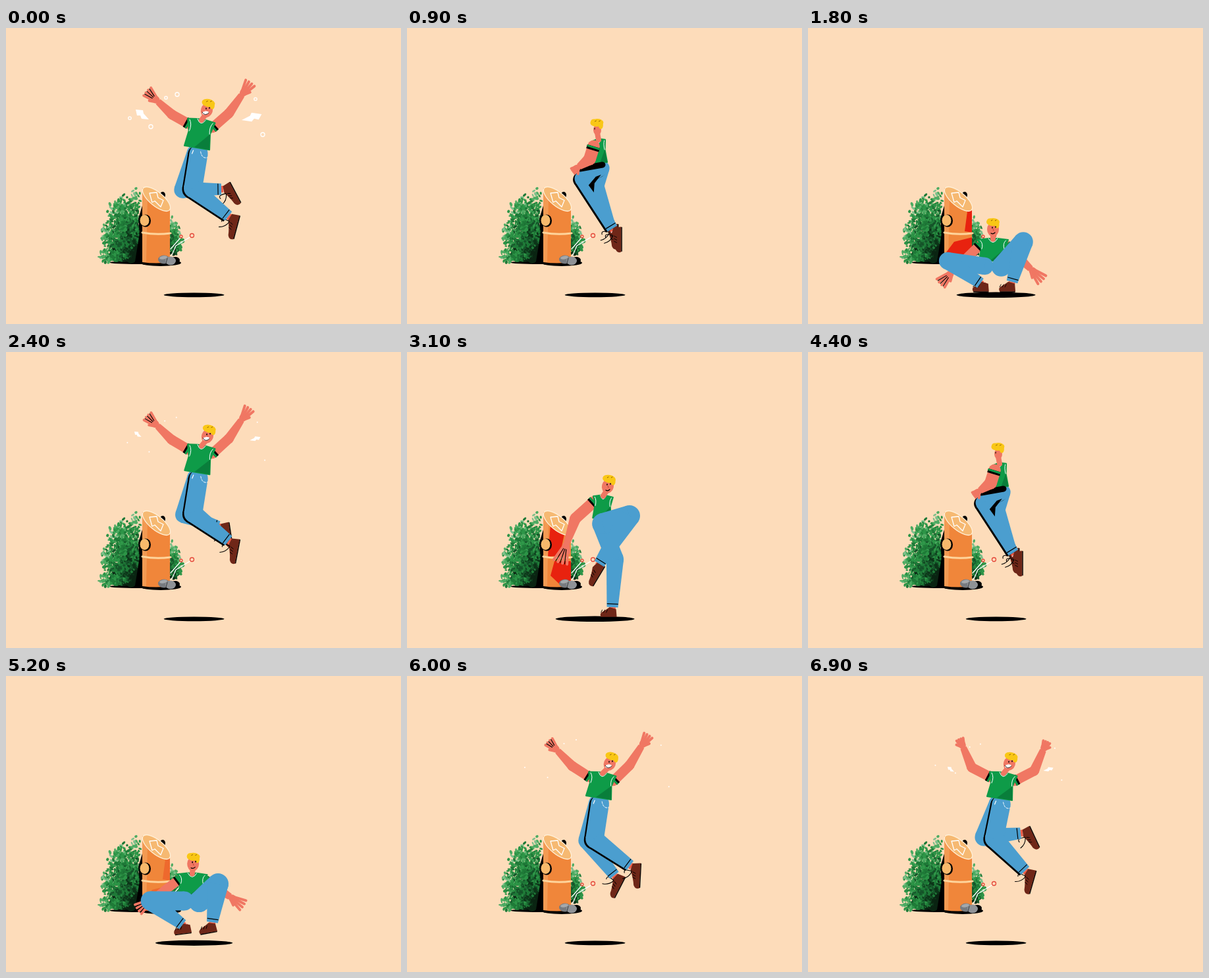
An HTML page with a canvas for the animation above (7 s loop, 600 px wide and 450 px high).

```html
<!DOCTYPE html>
<html lang="en">
<head>
<meta charset="utf-8">
<title>Jump</title>
<style>
html, body { margin: 0; width: 100%; height: 100%; overflow: hidden; background: #fddcba; }
canvas { display: block; width: 600px; height: 450px; }
</style>
</head>
<body>
<canvas id="stage" width="600" height="450"></canvas>
<script>
const view = document.getElementById('stage').getContext('2d');
let c = view;

const BG = '#fddcba', SKIN = '#f07763', GREEN = '#0e9b48', BLUE = '#4b9ecf',
  BROWN = '#6f2718', HAIR = '#f9c716', RED = '#e8220f', BLACK = '#000', WHITE = '#fff';
const CYCLE = 3500 / 3, STEP = 100;

// Key poses of one jump. Leg "back" is the one behind in the air; "wide" is half the shoulder width.
const leap = {
  t: 0, neck: [297, 140], hip: [290, 182], wide: 21, tilt: 8, bow: .06, reach: 16,
  wristL: [231, 112], wristR: [358, 102],
  back: { knee: [268, 246], ankle: [327, 245], toe: 62 },
  front: { knee: [284, 244], ankle: [338, 286], toe: 105 }
};
const fall = {
  ...leap, t: 167, neck: [297, 148], hip: [291, 185], tilt: 11, reach: 13,
  wristL: [229, 114], wristR: [356, 107],
  back: { knee: [273, 250], ankle: [315, 303], toe: 117 },
  front: { knee: [285, 248], ankle: [339, 288], toe: 93 }
};
const crouch = {
  t: 633, neck: [281, 321], hip: [281, 354], wide: 23, tilt: 0, bow: 0, reach: 18,
  wristL: [219, 371], wristR: [338, 366],
  back: { knee: [212, 354], ankle: [262, 388], toe: 180 },
  front: { knee: [327, 325], ankle: [310, 386], toe: 180 }
};
const kick = {
  t: 767, neck: [298, 219], hip: [296, 253], wide: 15, tilt: 7, bow: -.13, reach: 25,
  wristL: [243, 290], wristR: [304, 240],
  back: { knee: [338, 249], ankle: [292, 322], toe: 121 },
  front: { knee: [316, 315], ankle: [312, 388], toe: 180 }
};
const turn = {
  t: 900, neck: [291, 170], hip: [295, 205], wide: 10, tilt: -2, bow: .17, reach: 4,
  wristL: [261, 211], wristR: [294, 195],
  back: { knee: [288, 240], ankle: [308, 300], toe: 90 },
  front: { knee: [266, 229], ankle: [312, 305], toe: 90 }
};
const rise = {
  ...leap, t: 1067, neck: [297, 148], hip: [291, 186], tilt: 9, bow: .18, reach: 7,
  wristL: [236, 109], wristR: [357, 113],
  back: { knee: [267, 245], ankle: [323, 239], toe: 65 },
  front: { knee: [283, 247], ankle: [330, 296], toe: 106 }
};
const POSES = [leap, fall, crouch, kick, turn, rise, { ...leap, t: CYCLE }];

function mix(a, b, f) {
  if (typeof a === 'number') return a + (b - a) * f;
  if (Array.isArray(a)) return a.map((v, i) => mix(v, b[i], f));
  return Object.fromEntries(Object.keys(a).map(k => [k, mix(a[k], b[k], f)]));
}
const clamp = (v, lo = 0, hi = 1) => Math.max(lo, Math.min(hi, v));
const smooth = f => f * f * (3 - 2 * f);

function poseAt(p) {
  let i = POSES.length - 2;
  while (POSES[i].t > p + .5) i--;
  const a = POSES[i], b = POSES[i + 1];
  return mix(a, b, smooth(clamp((p - a.t) / (b.t - a.t))));
}

function poly(pts, fill, line, width = 1, closed = true) {
  c.beginPath();
  for (let i = 0; i < pts.length; i += 2) c.lineTo(pts[i], pts[i + 1]);
  if (closed) c.closePath();
  if (fill) { c.fillStyle = fill; c.fill(); }
  if (line) { c.strokeStyle = line; c.lineWidth = width; c.stroke(); }
}
const seg = (x1, y1, x2, y2, color, w) => poly([x1, y1, x2, y2], null, color, w, false);

function oval(x, y, rx, ry, color, rot = 0, line) {
  c.beginPath();
  c.ellipse(x, y, rx, ry, rot, 0, 7);
  if (color) { c.fillStyle = color; c.fill(); }
  if (line) { c.strokeStyle = line; c.lineWidth = 1.3; c.stroke(); }
}
function curve(x1, y1, qx, qy, x2, y2, color, w) {
  c.beginPath();
  c.moveTo(x1, y1);
  c.quadraticCurveTo(qx, qy, x2, y2);
  c.strokeStyle = color;
  c.lineWidth = w;
  c.stroke();
}
function moved(x, y, rot, sx, sy, draw) {
  c.save();
  c.translate(x, y);
  c.rotate(rot);
  c.scale(sx, sy);
  draw();
  c.restore();
}

function taper([x1, y1], [x2, y2], w1, w2, color) {
  const a = Math.atan2(y2 - y1, x2 - x1), s = Math.sin(a) / 2, k = Math.cos(a) / 2;
  poly([x1 + s * w1, y1 - k * w1, x2 + s * w2, y2 - k * w2,
    x2 - s * w2, y2 + k * w2, x1 - s * w1, y1 + k * w1], color);
}
function limb([a, b, e], [wa, wb, we], color) {
  oval(...a, wa / 2, wa / 2, color);
  oval(...b, wb / 2, wb / 2, color);
  taper(a, b, wa, wb, color);
  taper(b, e, wb, we, color);
}

function hand(reach, inked) {
  oval(5, 0, 7, 5.5, SKIN);
  const tip = (a, o) => [7 + Math.cos(a) * reach, o * 2.2 + Math.sin(a) * reach];
  for (let o = -1.5; o < 2; o++) seg(6, o * 2.2, ...tip(o * .2, o), SKIN, 4);
  seg(3, -3, 6 + reach * .3, -8, SKIN, 4);
  if (inked) for (let o = -1; o < 2; o++) seg(10, o * 2.2, ...tip(o * .2, o), BLACK, 1.1);
}

function arm(b, side) {
  const s = side < 0 ? b.shoulderL : b.shoulderR, w = side < 0 ? b.wristL : b.wristR;
  const dx = w[0] - s[0], dy = w[1] - s[1], k = b.bow * side;
  const e = [s[0] + dx * .5 - dy * k, s[1] + dy * .5 + dx * k];
  const thick = 15 + (21 - b.wide) * .35;
  limb([s, e, w], [thick, thick, 10], SKIN);
  moved(...w, Math.atan2(w[1] - e[1], w[0] - e[0]), 1, -side, () => hand(b.reach, side < 0 && b.reach > 9));
  const a = Math.atan2(e[1] - s[1], e[0] - s[0]);
  c.lineCap = 'butt';
  seg(...s, s[0] + Math.cos(a) * 6, s[1] + Math.sin(a) * 6, BLACK, thick + 1);
  seg(...s, s[0] + Math.cos(a) * 3, s[1] + Math.sin(a) * 3, GREEN, thick + 1);
  c.lineCap = 'round';
}

function shoe(len, loose) {
  c.beginPath();
  c.moveTo(-6, -2);
  c.lineTo(4, -5);
  c.quadraticCurveTo(len * .45, 0, len - 11, 1);
  c.quadraticCurveTo(len - 4, 4, len - 7, 10);
  c.lineTo(-7, 10);
  c.closePath();
  c.fillStyle = BROWN;
  c.fill();
  seg(-6, 10.5, len - 8, 10.5, BLACK, 1.4);
  for (let x = 7; x < 17; x += 4) seg(x, -1, x + 2, 3, BLACK, .9);
  if (!loose) return;
  curve(7, -3, 16, -7, 18, -16, BLACK, 1.1);
  curve(6, -3, 2, -16, 9, -14, BLACK, 1.1);
}

function leg(b, l, hip, shaded) {
  const [kx, ky] = l.knee, [ax, ay] = l.ankle;
  // A longer thigh gets thinner, and a figure seen from the side is slimmer.
  const girth = clamp(1500 / Math.hypot(kx - hip[0], ky - hip[1]), 19, 32) * clamp(b.wide / 14, .7, 1);
  const joints = [hip, l.knee, l.ankle], widths = [girth, girth, 17];
  const a = Math.atan2(ay - ky, ax - kx), ux = Math.cos(a), uy = Math.sin(a);
  const across = (d, w, color, line) =>
    seg(ax + ux * d + uy * w, ay + uy * d - ux * w, ax + ux * d - uy * w, ay + uy * d + ux * w, color, line);
  const toe = l.toe * Math.PI / 180;
  c.lineCap = 'butt';
  seg(ax, ay, ax + ux * 9, ay + uy * 9, '#ee5e48', 10);
  across(4, 5, WHITE, 1.2);
  c.lineCap = 'round';
  moved(ax + ux * 7, ay + uy * 5, toe, 1, -1, () => shoe(24 + 14 * Math.sin(toe), !b.low));
  if (shaded) moved(-2.5, 1.5, 0, 1, 1, () => limb(joints, widths, BLACK));
  limb(joints, widths, BLUE);
  across(-5, 8, BLACK, 1.2);
}

// Shoulders, hem and hips follow from the neck, the waist and the width.
function body(pose) {
  const { neck: n, hip: h, wide } = pose;
  const len = Math.hypot(h[0] - n[0], h[1] - n[1]), dx = (h[0] - n[0]) / len, dy = (h[1] - n[1]) / len;
  const spot = (down, out) => [n[0] + dx * down + dy * out, n[1] + dy * down - dx * out];
  const gap = 1 + .1 * (pose.front.knee[0] - pose.back.knee[0]);
  return {
    ...pose, spot, len, low: h[1] > 215,
    shoulderL: spot(9, -wide * .86), shoulderR: spot(9, wide * .86),
    hipB: [h[0] - gap, h[1] + 8], hipF: [h[0] + gap, h[1] + 9]
  };
}

function torso({ spot, len, wide: w }) {
  const side = s => [spot(1, w * s), spot(len * .45, w * .78 * s), spot(len, w * .92 * s)];
  const [ls, la, lh] = side(-1), [rs, ra, rh] = side(1);
  const neckL = spot(-1, -w * .3), neckR = spot(-1, w * .3);
  poly([ls, neckL, neckR, rs, ra, rh, lh, la].flat(), GREEN, GREEN, 2);
  poly([ra, rh, spot(len, -w * .2)].flat(), 'rgba(0,60,30,.3)');
  curve(...neckL, ...spot(11, 0), ...neckR, WHITE, 1);
  for (const s of [-1, 1]) curve(...spot(2, w * .85 * s), ...spot(len * .2, w * .62 * s), ...spot(len * .45, w * .74 * s), WHITE, 1);
}

function head(b, turned) {
  const x = b.neck[0] + b.tilt, y = b.neck[1] - 15, r = turned ? 6 : 9;
  const hx = x + b.tilt * .3, hy = y - 11;
  seg(x, y + 4, ...b.neck, SKIN, 8);
  oval(x, y, r, r + 2, SKIN, b.tilt * .035);
  oval(hx, hy, 10, 6, HAIR, b.tilt * .025);
  oval(hx - 5, hy - 1, 4.5, 4.5, HAIR);
  oval(hx + 6, hy + 4, 3.5, 5.5, HAIR);
  for (const d of [-3, 3]) seg(hx + d, hy - 2, hx + d + 2, hy - 3, '#8a5a00', .9);
  if (turned) return seg(x - 4, y - 3, x - 4, y - 1, BLACK, 1);
  for (const d of [0, 5]) seg(x + d - 1, y - 3 - d * .2, x + d - 1, y - 2 - d * .2, BLACK, 1.6);
  seg(x, y, x + 1, y + 2, '#b93d30', 1);
  if (b.low) return curve(x - 3, y + 6, x, y + 8, x + 3, y + 5, BLACK, 1.2);
  oval(x - 2, y + 4, 5, 2.6, WHITE, -.15);
  curve(x - 7, y + 3, x - 3, y + 10, x + 3, y + 4, BLACK, .8);
}

function person(pose) {
  const b = body(pose), turned = b.wide < 12, [hx, hy] = b.hipF;
  const back = () => leg(b, b.back, b.hipB, false);
  const front = () => leg(b, b.front, b.hipF, !b.low);
  if (b.wide > 18) arm(b, 1);
  if (!turned) arm(b, -1);
  if (b.low) { torso(b); front(); back(); }
  else { back(); front(); torso(b); }
  if (turned) {
    poly([hx - 18, hy + 25, hx - 7, hy + 12, hx + 1, hy + 9, hx - 9, hy + 22, hx - 10, hy + 36], BLACK);
    moved(2, 3, 0, 1, 1, () => seg(...b.wristL, ...b.hip, BLACK, 9));
    arm(b, -1);
  } else if (!b.low) {
    seg(hx - 8, hy - 5, hx - 10, hy, WHITE, 1.2);
    c.setLineDash([3, 2]);
    curve(hx + 3, hy - 3, hx + 5, hy + 8, hx + 13, hy + 6, WHITE, 1);
    c.setLineDash([]);
  }
  head(b, turned);
}

// Sparks fly outward around the top of the jump.
function sparks(p) {
  const u = (p > CYCLE / 2 ? p - CYCLE : p) / 100;
  if (u < -1.35 || u > 2.3) return;
  const size = u < 0 ? 1 + u * .5 : clamp(1 - u * .7);
  const zigzag = () => poly([-10, -8, 1, -7, 2, -2, 10, 7, -1, 6, -3, 1, -8, 1], WHITE);
  moved(207 - u * 10, 132 - u * 10, 0, size, size, zigzag);
  moved(373 + u * 8, 136 - u * 6, .2, -size * 1.4, size, zigzag);
  for (const [x, y] of [[260, 101], [188, 137], [390, 162], [379, 108], [243, 106], [220, 150]]) {
    const r = (x % 10 ? 2.2 : 3) * size;
    const px = x + (x - 297) * .05 * u, py = y + (y - 125) * .1 * u;
    if (r > 2) oval(px, py, r, r, null, 0, WHITE);
    else oval(px, py, 1, 1, WHITE);
  }
}

// Leafy twigs fan out from a root to the edge of an ellipse.
function bush() {
  let seed = 11;
  const rnd = () => (seed = seed * 16807 % 2147483647) / 2147483647;
  const tones = ['#0d3519', '#16552a', '#1f7a38', '#2d9547', '#4dab62', '#7fc18c', '#a9d6ac'];
  const fan = (x, y, rx, ry, from, to, twigs) => {
    for (let i = 0; i < twigs; i++) {
      const a = from + (to - from) * rnd(), reach = .45 + .55 * Math.sqrt(rnd());
      for (let s = .3; s < 1; s += .07) {
        const d = s * reach, px = x + Math.cos(a) * rx * d + rnd() * 8 - 4;
        const py = y + Math.sin(a) * ry * d + rnd() * 8 - 4;
        const tone = clamp(Math.floor(d * 4.5 + rnd() * 3 - 1.2), 0, 6);
        oval(px, Math.min(py, 356), 1.8 + rnd() * 1.7, 1 + rnd() * 1.1, tones[tone], rnd() * 3);
      }
    }
  };
  oval(190, 322, 15, 36, '#0a2412');
  oval(177, 340, 17, 16, '#0a2412');
  fan(196, 348, 58, 112, 3.05, 4.85, 120);
  fan(250, 345, 19, 58, 4.7, 6, 26);
}

function post() {
  c.beginPath();
  c.moveTo(207, 243);
  c.lineTo(249, 277);
  c.lineTo(249, 356);
  c.quadraticCurveTo(228, 359, 207, 356);
  c.closePath();
}

function scenery() {
  oval(200, 356.5, 43, 2.5, BLACK);
  bush();
  oval(235, 357, 31, 5, BLACK);
  poly([207, 270, 201, 290, 203, 312, 196, 355, 210, 360], BLACK);
  oval(238, 254, 4, 5, BLACK);
  post();
  c.fillStyle = '#f0863a';
  c.fill();
  poly([207, 250, 215, 258, 213, 356, 207, 356], '#f39a53');
}

function details() {
  oval(228.5, 260, 26, 10.5, '#f6b972', .69, '#fff0d8');
  poly([218, 251, 229, 250, 231, 258, 239, 262, 235, 272, 226, 263, 222, 265], null, WHITE, 1.3);
  curve(207, 311, 228, 315, 250, 312, '#ffd49b', 3);
  oval(212, 293, 8, 9.5, BLACK);
  oval(210.5, 292.5, 7, 8.5, '#f7b96c');
  poly([252, 345, 258, 331, 281, 317], null, WHITE, 1.3, false);
  seg(250, 336, 265, 319, WHITE, 1.3);
  oval(282.5, 315.5, 3, 3, null, 0, '#e5483a');
  oval(266, 317, 2, 2, null, 0, '#e5483a');
  oval(257, 353, 7, 5, BLACK);
  oval(240, 352, 9, 6.5, '#777b80');
  oval(250, 354, 8, 6.5, '#8f9296');
  oval(239, 349, 6, 2.5, '#a5a8ab', -.2);
  seg(245, 350, 243, 358, '#3b3d40', 1);
}

function layer(draw) {
  const cv = document.createElement('canvas');
  cv.width = 600;
  cv.height = 450;
  c = cv.getContext('2d');
  c.lineCap = c.lineJoin = 'round';
  draw();
  c = view;
  return cv;
}
const backdrop = layer(scenery), trim = layer(details);

// The figure throws a red reflection on the post while it is near.
function glow(p) {
  const near = t => clamp(1.2 - Math.abs(p - t) / 110);
  c.save();
  post();
  c.clip();
  c.globalAlpha = near(crouch.t);
  poly([242, 279, 250, 276, 250, 311, 238, 309], RED);
  poly([207, 345, 222, 325, 250, 318, 250, 358, 207, 358], RED);
  c.globalAlpha = near(kick.t);
  poly([218, 262, 240, 272, 232, 310, 214, 311], RED);
  poly([224, 318, 250, 318, 250, 346, 236, 357, 218, 340], RED);
  c.restore();
}

function frame(now) {
  const p = Math.floor(now / STEP) * STEP % 7000 % CYCLE;
  const pose = poseAt(p);
  const near = clamp((Math.max(pose.front.ankle[1], pose.back.ankle[1]) - 310) / 75);
  c.lineCap = c.lineJoin = 'round';
  c.fillStyle = BG;
  c.fillRect(0, 0, 600, 450);
  c.drawImage(backdrop, 0, 0);
  glow(p);
  c.drawImage(trim, 0, 0);
  oval(285.6, 405.8, 46 + 14 * near, 3.4 + .8 * near, BLACK);
  sparks(p);
  person(pose);
}

const start = performance.now();
(function tick() {
  frame(performance.now() - start);
  requestAnimationFrame(tick);
})();
</script>
</body>
</html>
```
